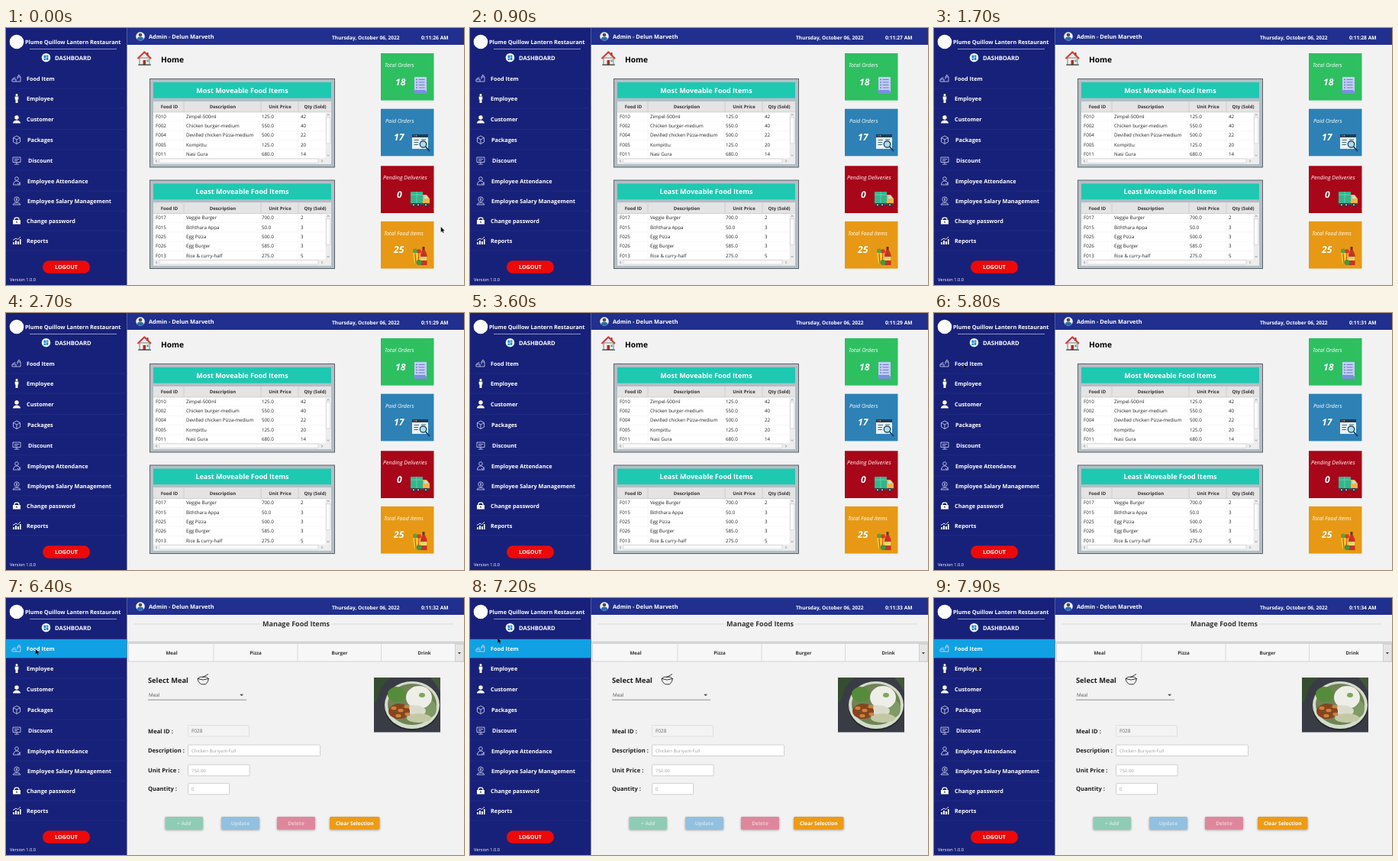
Animation, 600 px wide and 336 px high, one loop 8 s. Source, as an HTML page:

```html
<!DOCTYPE html>
<html lang="en">
<head>
<meta charset="utf-8">
<title>Restaurant dashboard</title>
<style>
html, body { margin: 0; width: 100%; height: 100%; overflow: hidden; background: #f2f2f3; }
svg { display: block; width: 100vw; height: 100vh; font-family: "Open Sans", "Noto Sans", sans-serif; text-rendering: geometricPrecision; }
.button { filter: drop-shadow(0 1px 1.5px rgba(0, 0, 0, .35)); }
</style>
</head>
<body>
<svg id="stage" viewBox="0 0 600 336"></svg>
<script>
const LOOP = 8000, STEP = 100;
const PAGE_SWITCH = 6100;
const FIRST_TICK = 610, TICK = 1040;

const rect = (x, y, w, h, fill, extra = '') =>
  `<rect x="${x}" y="${y}" width="${w}" height="${h}" fill="${fill}" ${extra}/>`;
const path = (d, stroke, width = 1, fill = 'none') =>
  `<path d="${d}" stroke="${stroke}" stroke-width="${width}" fill="${fill}"/>`;
const shape = (d, fill) => `<path d="${d}" fill="${fill}"/>`;
const circle = (x, y, r, fill, extra = '') => `<circle cx="${x}" cy="${y}" r="${r}" fill="${fill}" ${extra}/>`;
const ellipse = (x, y, rx, ry, fill) => `<ellipse cx="${x}" cy="${y}" rx="${rx}" ry="${ry}" fill="${fill}"/>`;
const text = (x, y, size, fill, str, extra = '') =>
  `<text x="${x}" y="${y}" font-size="${size}" fill="${fill}" ${extra}>${str}</text>`;
const bold = (x, y, size, fill, str, extra = '') => text(x, y, size, fill, str, 'font-weight="700" ' + extra);
const MID = 'text-anchor="middle"';
const at = (x, y, content) => `<g transform="translate(${x} ${y})">${content}</g>`;
const NAVY = '#182179', HEADER = '#212f8e', INK = '#1d1d1d', PAGE = '#f2f2f3';
const SIDE = 158.5;

// Sidebar icons, each drawn around its own centre
const line = d => path(d, '#d5daf5', 0.8);
const solid = d => shape(d, '#fff');
const menu = [
  ['Food Item', 27, 66, line('M-6 4V1H-1V4ZM-5 1Q-4 -2 -1.5 -1M-1 4H5V-2H1V1M1 -2L3 -5L5 -2')],
  ['Employee', 27, 92, circle(0, -4.6, 1.5, '#fff') + solid('M-2.3 -2.6H2.3V1.5H1.5V6H-1.5V1.5H-2.3Z')],
  ['Customer', 27, 119.5, circle(0, -2.5, 2.7, '#fff') + solid('M-5 5Q-5 1.8 0 1Q5 1.8 5 5Z')],
  ['Packages', 28, 146, line('M0 -5L4.5 -2.5V3L0 5.5L-4.5 3V-2.5ZM-4.5 -2.5L0 0L4.5 -2.5M0 0V5.5')],
  ['Discount', 29, 173, line('M-5 -4H5V2.5H-5ZM0 2.5V5M-3 5H3M-3 -1.5H3M-3 .5H1')],
  ['Employee Attendance', 28, 200, circle(0, -3, 2.3, 'none', 'stroke="#d5daf5" stroke-width=".8"') + line('M-4.5 5Q-4 0 0 0Q4 0 4.5 5ZM1 3L2.4 4.4L5 1.5')],
  ['Employee Salary Management', 28, 226, circle(0, -2, 3.2, 'none', 'stroke="#d5daf5" stroke-width=".8"') + line('M-5 5Q-4 2 0 2.5Q4 2 5 5ZM0 -4V0M-1 -2H1')],
  ['Change password', 27, 252, solid('M-5 -1H5V4.5H-5Z') + path('M-3 -1V-2Q-3 -4.2 0 -4.2Q3 -4.2 3 -2V-1', '#fff', 1.2) + circle(0, 1.7, .9, NAVY)],
  ['Reports', 27, 278, solid('M-5 5V2H-3V5ZM-2 5V0H0V5ZM1 5V1H3V5ZM4 5V-2H5.6V5Z') + path('M-5 -.5L-1 -3L1.5 -1.5L5 -5', '#fff', .9)]
];

function sidebar() {
  const rows = menu.map(([label, x, y, icon]) =>
    path(`M0 ${y + 13}H${SIDE}`, '#27328c', .6) + at(14, y, icon) + bold(x, y + 2.8, 7.3, '#fff', label)).join('');
  return rect(0, 0, SIDE, 336, NAVY) +
    rect(0, 54, SIDE, 24.3, '#10a0e4', 'id="active" stroke="#4f9fce" stroke-width=".6" stroke-dasharray="1 1"') +
    circle(14, 18, 9.3, '#fff') +
    bold(25, 20.6, 7.25, '#fff', 'Plume Quillow Lantern Restaurant') +
    path('M31 27.5H145', '#aab1dd', .8) +
    circle(52.5, 38.7, 5.8, '#e9f5ff') +
    rect(49.6, 35.7, 2.5, 3.5, '#1686cf') + rect(52.8, 35.7, 2.5, 2, '#1686cf') +
    rect(49.6, 39.9, 2.5, 2, '#1686cf') + rect(52.8, 38.4, 2.5, 3.5, '#1686cf') +
    bold(64, 41.5, 7.6, '#fff', 'DASHBOARD') + rows +
    rect(48, 304.3, 62, 16.5, '#ee0909', 'rx="8.2"') +
    bold(79, 315.2, 7.1, '#fff', 'LOGOUT', MID) +
    text(5, 331, 5.7, '#fff', 'Version 1.0.0');
}

function header() {
  return rect(SIDE, 0, 600 - SIDE, 22, HEADER) +
    circle(176, 11, 5.8, '#eef3f8') + circle(176, 9, 2.3, '#5b4a45') +
    shape('M171.8 15Q172 11.6 176 11.6Q180 11.6 180.2 15Q176 18.4 171.8 15Z', '#2a6ea8') +
    bold(187, 13.6, 7.4, '#fff', 'Admin - Delun Marveth') +
    bold(427, 15, 6.6, '#fff', 'Thursday, October 06, 2022') +
    bold(544, 15, 6.7, '#fff', '', 'id="clock"');
}

function foodTable(y, title, rows) {
  const columns = [[214, 'Food ID'], [284, 'Description'], [359, 'Unit Price'], [405, 'Qty (Sold)']];
  const cellX = [196, 236, 335, 386];
  const arrow = (x, y, d) => at(x, y, path(d, '#8a8a8a', .7));
  const cells = rows.map((row, i) =>
    row.map((cell, c) => text(cellX[c], 51.8 + i * 12.3, 6.2, '#222', cell)).join('') +
    (i < 4 ? path(`M193 ${56 + i * 12.3}H418`, '#eeeeee', .5) : '')).join('');
  return at(0, y, rect(188.5, .5, 242, 115.5, '#b3bec5', 'stroke="#596168" stroke-width="1"') +
    rect(193, 5, 233, 20.7, '#1fc8b1') +
    bold(309.5, 18.6, 9, '#fff', title, MID) +
    rect(193, 30, 233, 82, '#fff') + rect(193, 30, 233, 14, '#e4e4e4') + path('M193 44H426', '#bcbcbc', .6) +
    [233, 334, 383].map(x => path(`M${x} 30V44`, '#c0c0c0', .6) + path(`M${x} 44V104`, '#ececec', .5)).join('') +
    columns.map(([x, label]) => bold(x, 39.3, 6, '#333', label, MID)).join('') + cells +
    rect(418.5, 44, 7.5, 60, '#ededed') + rect(419.5, 51, 5.5, 34, '#fafafa', 'stroke="#c4c4c4" stroke-width=".5"') +
    rect(193, 104, 233, 8, '#ededed') + rect(201, 105, 208, 5.5, '#fafafa', 'stroke="#c4c4c4" stroke-width=".5"') +
    arrow(422, 47.5, 'M-1.5 1L0 -1L1.5 1') + arrow(422, 100.5, 'M-1.5 -1L0 1L1.5 -1') +
    arrow(197, 108, 'M1 -1.5L-1 0L1 1.5') + arrow(414, 108, 'M-1 -1.5L1 0L-1 1.5'));
}

const documentIcon =
  shape('M535 64H551V83H535Z', '#c3ccf5') + shape('M533 81H549L552 86H536Z', '#7d8ee0') +
  [67.5, 71, 74.5, 78].map(y => circle(538, y, .8, '#3f55b8') + path(`M540.5 ${y}H548.5`, '#6b7cd0', 1)).join('');
const invoiceIcon =
  rect(532, 139, 21, 19, '#e9f0f5') + rect(532, 139, 21, 4, '#1c3d57') +
  circle(535, 141, .8, '#f25b5b') + circle(537.5, 141, .8, '#f7c752') +
  path('M534.5 146.5H541M534.5 149.5H540M534.5 152.5H540M544 146H550', '#3f6684', 1) +
  circle(546.5, 152, 4.2, '#a9dcf5', 'stroke="#17364e" stroke-width="1.2"') + path('M549.5 155L555 161', '#17364e', 1.8);
const truckIcon =
  rect(530, 214, 16, 15, '#33b58d') + path('M530 218H546M538 214V229', '#74d5b4', .8) +
  shape('M546 218H551L555 223V230H546Z', '#f2b04c') + shape('M548 219.5H551L553.3 223H548Z', '#b9e5f5') +
  rect(530, 229, 25, 2, '#404d58') +
  [534, 540, 550].map(x => circle(x, 231.3, 2.4, '#263238') + circle(x, 231.3, 1, '#dde4e8')).join('');
const groceryIcon =
  shape('M533 294H544L543 308H535Z', '#f6ca2c') + path('M536 295L537 308M541 295L540 308', '#db4a25', 1.2) +
  circle(536, 291.5, 3, '#51a837') + circle(541, 292, 2.8, '#d9372d') +
  rect(545.5, 286, 3, 5, '#663625') + shape('M545.5 290H548.5L551.5 296V310H543V296Z', '#c73327') +
  rect(543, 299, 8.5, 5, '#f4d36a') + circle(541, 306.5, 3.4, '#3d9c3d');

function card(y, fill, labelX, label, valueX, value, icon) {
  return rect(491, y, 69.5, 61.7, fill) +
    text(labelX, y + 17.8, 7.2, '#fff', label, 'font-style="italic"') +
    bold(valueX, y + 41.5, 12.2, '#fff', value, 'font-style="italic"') + icon;
}

function homePage() {
  const house = rect(175, 39, 13, 9, '#f3efe6', 'stroke="#455" stroke-width=".7"') +
    rect(184.5, 32, 2, 5, '#8a3a31') + path('M172.5 40L181.3 31.5L190 40', '#d43c32', 2.2) +
    rect(179.5, 42, 3.6, 6, '#a8322b') + rect(184.3, 41.5, 2.4, 2.8, '#4aa6d4') + path('M173 48.2H190', '#30363c', 1);
  return house + bold(203, 45, 10.2, '#000', 'Home') +
    foodTable(66, 'Most Moveable Food Items', [
      ['F010', 'Zimpel-500ml', '125.0', '42'],
      ['F002', 'Chicken burger-medium', '550.0', '40'],
      ['F004', 'Devilled chicken Pizza-medium', '500.0', '22'],
      ['F005', 'Kompittu', '125.0', '20'],
      ['F011', 'Nasi Gura', '680.0', '14']]) +
    foodTable(198.5, 'Least Moveable Food Items', [
      ['F017', 'Veggie Burger', '700.0', '2'],
      ['F015', 'Biththara Appa', '50.0', '3'],
      ['F025', 'Egg Pizza', '500.0', '3'],
      ['F026', 'Egg Burger', '585.0', '3'],
      ['F013', 'Rice &amp; curry-half', '275.0', '5']]) +
    card(33, '#2ebf61', 496, 'Total Orders', 510, '18', documentIcon) +
    card(105.7, '#2d81b5', 497, 'Paid Orders', 508, '17', invoiceIcon) +
    card(180.3, '#a80619', 494, 'Pending Deliveries', 512, '0', truckIcon) +
    card(252.8, '#e79915', 495, 'Total Food Items', 508, '25', groceryIcon);
}

function mealPhoto() {
  return rect(482, 104, 87, 71.5, '#3a3c45') +
    shape('M482 104H504Q490 114 486 134L482 138Z', '#354d30') + shape('M556 104H569V124Q564 112 556 104Z', '#42583a') +
    ellipse(532, 143, 36, 30, '#24262c') + ellipse(532, 140, 36, 31, '#d3dccb') +
    ellipse(532, 139, 32, 27, '#6f8456') +
    ellipse(512, 126, 12, 10, '#558c3a') + ellipse(553, 145, 11, 12, '#7f9a62') +
    ellipse(541, 130, 17, 15, '#eeeee8') + ellipse(533, 148, 17, 8, '#dcdacb') +
    ellipse(541, 157, 16, 6, '#c3c9a4') + ellipse(515, 148, 14, 10, '#87441f') +
    [[508, 144], [517, 147], [525, 142], [514, 154], [526, 152]].map(([x, y]) => ellipse(x, y, 3.6, 2.2, '#c9843f')).join('') +
    ellipse(545, 127, 4, 3, '#7da85a');
}

function field(y, w, label, value, disabled) {
  return bold(186, y + 10, 7.6, INK, label) +
    rect(238.5, y, w, 14.5, disabled ? '#f3f3f3' : '#fff', `rx="1" stroke="${disabled ? '#dadada' : '#c6c6c6'}" stroke-width=".8"`) +
    text(243, y + 9.5, disabled ? 6.5 : 6, disabled ? '#666' : '#a0a0a0', value);
}

function button(x, w, fill, label, color) {
  return rect(x, 286, w, 16.5, fill, 'rx="1.5" class="button"') +
    bold(x + w / 2, 296.7, 6.7, color, label, MID);
}

function foodPage() {
  const tabs = [[217, 'Meal'], [327, 'Pizza'], [437, 'Burger'], [548, 'Drink']];
  return path('M167 34H333M427 34H586', '#d5d2cc', .8) +
    bold(380, 37, 9.05, '#333', 'Manage Food Items', MID) +
    rect(SIDE, 57, 442, 2.5, '#dedee0') + path('M159 57.3H600', '#c2c2c4', .8) +
    rect(160.5, 59.5, 440, 23.5, '#f7f7f8', 'stroke="#c8c8c8" stroke-width=".8"') +
    [272, 382, 491.5].map(x => path(`M${x} 60V83`, '#d2d2d2', .8)).join('') +
    tabs.map(([x, label]) => bold(x, 74, 6.2, '#333', label, MID)).join('') +
    rect(588.5, 60, 11, 23, '#e6e6e6', 'stroke="#bbb" stroke-width=".6"') + shape('M592 71H596L594 73.6Z', '#444') +
    bold(186, 111, 9.3, INK, 'Select Meal') +
    path('M251 105.5Q251.5 110 255.5 112.8H261.5Q265 110 265.5 105.5Q258 108.5 251 105.5Q254 102.5 258 103Q263 102.5 265.5 105.5M257 104L265 99.5', '#222', .9) +
    text(187, 129.2, 6.3, '#555', 'Meal') + shape('M306.3 125.8H311L308.7 128.3Z', '#444') +
    path('M186 133.2H315', '#777', .8) + mealPhoto() +
    field(166.5, 80, 'Meal ID :', 'F028', true) +
    field(192, 173, 'Description :', 'Chicken Buriyani-Full') +
    field(218, 80.5, 'Unit Price :', '750.00') +
    field(242.3, 54, 'Quantity :', '0') +
    button(208.5, 49.5, '#8fccb6', '+ Add', '#c9e7dc') +
    button(282, 50, '#93c0de', 'Update', '#cbe1f0') +
    button(355, 50, '#e0869c', 'Delete', '#f0c5cf') +
    button(424, 65.5, '#ee9b14', 'Clear Selection', '#fff');
}

const stage = document.getElementById('stage');
stage.innerHTML = rect(0, 0, 600, 336, PAGE) +
  `<g id="home">${homePage()}</g><g id="food">${foodPage()}</g>` + sidebar() + header() +
  '<path id="cursor" d="M0 0V6.4L1.5 5.1L2.6 7.4L3.7 6.9L2.6 4.7H4.6Z" fill="#000" stroke="#777" stroke-width=".3"/>';
const [home, food, active, clock, cursor] =
  ['home', 'food', 'active', 'clock', 'cursor'].map(id => document.getElementById(id));

// Pointer stops: time, x, y; it waits beyond the right edge in between
const stops = [
  [0, 569.8, 260.3], [500, 569.8, 260.3], [700, 612, 252], [3700, 612, 230],
  [4300, 32, 66.5], [5000, 32.5, 66.5], [5600, 38.8, 67], [6500, 38.8, 67],
  [7100, 36.3, 52.3], [7300, 36.3, 52.3], [7800, 56, 88.3], [LOOP, 56, 88.3]
];

function pointerAt(t) {
  const i = stops.findIndex(stop => stop[0] > t);
  const [t0, x0, y0] = stops[i - 1], [t1, x1, y1] = stops[i];
  const p = (t - t0) / (t1 - t0), k = p * p * (3 - 2 * p);
  return [x0 + (x1 - x0) * k, y0 + (y1 - y0) * k];
}

function render(time) {
  const t = Math.floor((time % LOOP) / STEP) * STEP;
  const onFood = t >= PAGE_SWITCH;
  home.style.display = onFood ? 'none' : '';
  food.style.display = active.style.display = onFood ? '' : 'none';
  clock.textContent = `0:11:${27 + Math.floor((t - FIRST_TICK) / TICK)} AM`;
  cursor.setAttribute('transform', `translate(${pointerAt(t).join(' ')})`);
}

const start = performance.now();
function loop() {
  render(performance.now() - start);
  requestAnimationFrame(loop);
}
loop();
</script>
</body>
</html>
```
